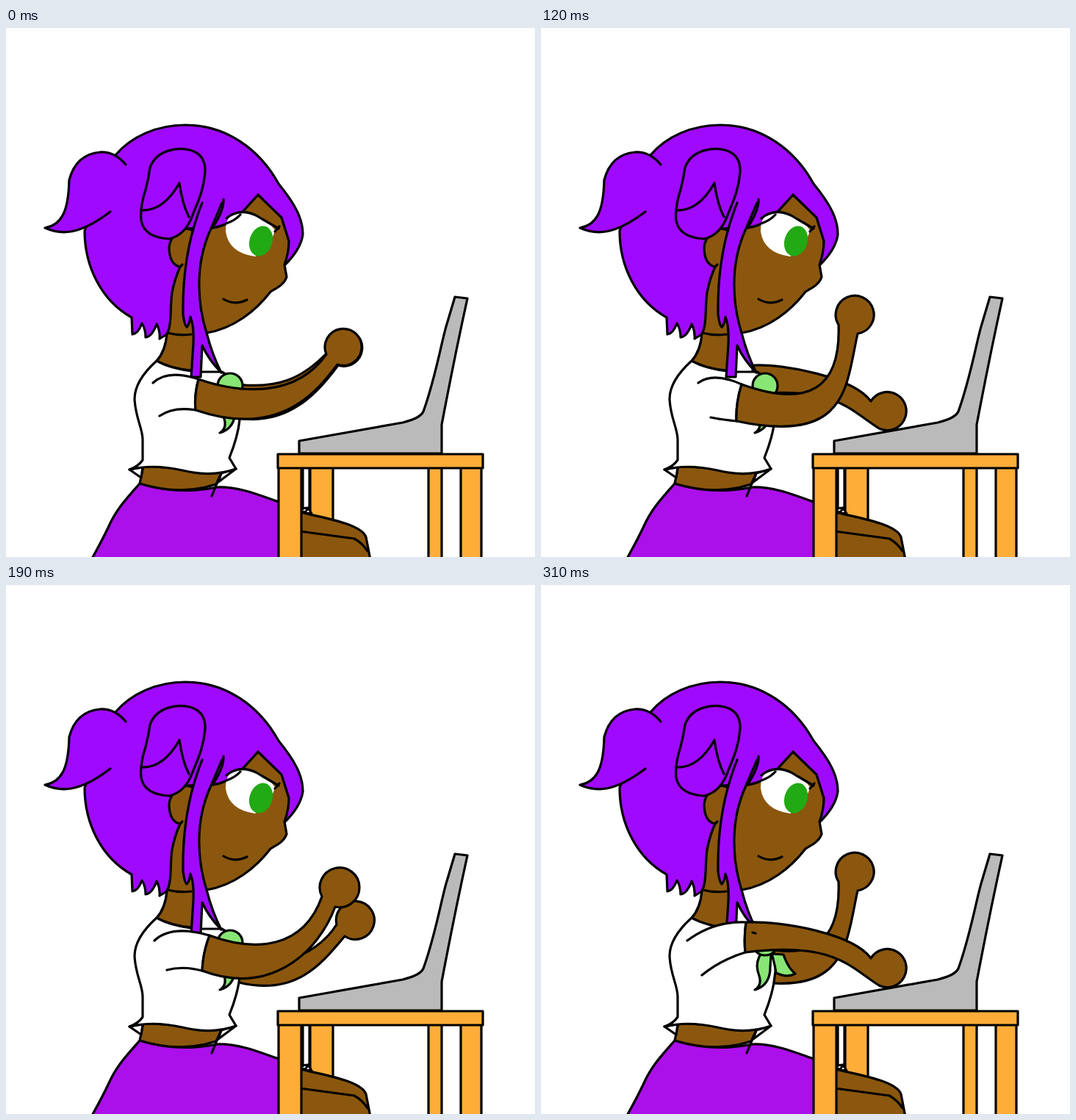
These frames come from a looping animation (720 px wide and 720 px high, 0.35 s). An HTML page:

```html
<!DOCTYPE html>
<html lang="en">
<head>
<meta charset="utf-8">
<title>Typing at the laptop</title>
<style>
  html, body { margin: 0; width: 100%; height: 100%; overflow: hidden; background: #fff; }
  svg { display: block; width: 100vw; height: 100vh; }
  path, rect { stroke: #000; stroke-width: 3.2; stroke-linejoin: round; stroke-linecap: round; fill: none; }
  .skin { fill: #8b570e; }
  .hair { fill: #9f0aff; }
  .skirt { fill: #ab10ea; }
  .white { fill: #fff; }
  .wood { fill: #ffad39; }
  .metal { fill: #bababa; }
  .scarf { fill: #88e674; }
  .bare { stroke: none; }
</style>
</head>
<body>
<svg viewBox="0 0 720 720">
  <!-- legs, skirt and desk -->
  <rect class="wood" x="414" y="596" width="31" height="74"/>
  <path class="skin" d="M400 659C440 668 484 676 490 693L496 724H400Z"/>
  <path d="M400 685L474 695Q485 701 492 712"/>
  <path class="white" d="M401 654L411 653L416 661L402 658M411 653L407 660"/>
  <path class="skirt" d="M116 724C128 702 132 695 139 680C150 655 165 639 182 620Q235 636 288 625C320 624 350 638 374 646V724Z"/>
  <rect class="wood" x="371" y="596" width="31" height="130"/>
  <path d="M404 600V655M413 600V654"/>
  <rect class="wood" x="575" y="596" width="18" height="130"/>
  <rect class="wood" x="619" y="596" width="28" height="130"/>
  <rect class="wood" x="370" y="580" width="279" height="19"/>
  <path class="metal" d="M399 562L540 537Q564 531 568 522C585 475 593 425 600 403L611 366L628 368Q610 450 593 540V579H399Z"/>

  <path class="skin" id="far"/>

  <!-- waist and shirt -->
  <path class="skin" d="M187 596L182 620Q237 637 286 621L294 604Z"/>
  <path class="white" d="M186 598L168 601L184 612ZM293 606L313 600L289 618Z"/>
  <path d="M293 606L280 637"/>
  <path class="white" d="M205 453Q175 480 175 505C176 530 186 545 186 560V588Q180 597 168 601Q200 593 240 602Q280 612 313 600L304 585Q316 555 318 533C322 510 318 482 294 468H265Q235 467 205 453Z"/>

  <!-- head -->
  <path class="hair" d="M149 173C170 148 205 132 244 132C300 132 345 165 371 212C392 238 404 258 404 281Q401 302 379 323L300 350L222 415L209 423Q210 412 205 403Q199 420 190 421Q190 410 185 402Q180 416 172 417L171 394C130 371 107 325 107 276Z"/>
  <path class="hair bare" d="M163 186Q148 168 128 169Q95 172 86 207C85 245 78 268 53 272C75 282 100 282 142 250Z"/>
  <path d="M163 186Q148 168 128 169Q95 172 86 207C85 245 78 268 53 272C75 282 100 282 142 250"/>
  <path class="skin" d="M343 227L375 258L385 290Q385 306 379 322L382 339C378 350 368 354 360 359C340 385 310 409 273 415L252 466Q225 464 205 453Q217 440 219 416C226 405 223 380 226 360Q230 340 237 325Q222 322 222 298Q224 280 246 273L281 272Q306 268 322 250Z"/>
  <path d="M220 415Q235 419 252 417M237 325L240 322"/>
  <path class="hair bare" d="M296 233Q297 248 281 272Q306 268 322 250L343 227L320 200Z"/>
  <path d="M281 272Q306 268 322 250L343 227"/>
  <path class="white bare" d="M299 277Q298 251 322 250Q350 252 366 275Q360 300 339 311Q303 306 299 277Z"/>
  <ellipse cx="347" cy="290" rx="15.5" ry="21" fill="#22aa14" transform="rotate(18 347 290)"/>
  <path d="M300 259Q321 242 347 259L371 273M366 277L372 270" stroke-width="4"/>
  <path d="M300 266Q312 262 319 254" stroke-width="2.5"/>
  <path d="M296 369Q311 378 328 370"/>

  <!-- front strands and near bun -->
  <path class="hair bare" d="M267 238C250 280 240 330 241 390Q243 405 246 407L251 393Q256 405 255 430L252 475H265L267 432Q276 452 293 469Q281 446 273 415C262 380 255 325 279 273L296 233Z"/>
  <path d="M267 238C250 280 240 330 241 390Q243 405 246 407Q250 403 251 393Q256 405 255 430L252 475H265L267 432Q276 452 293 469Q281 446 273 415C262 380 255 325 279 273L294 238"/>
  <path d="M296 233Q297 248 281 272M246 273L253 275"/>
  <path class="hair" d="M196 190C205 165 235 162 250 166Q272 172 271 196C269 220 262 235 255 252Q245 282 222 287Q188 285 184 262Q182 245 190 220Q194 205 196 190Z"/>
  <path d="M184 248Q214 250 236 211Q240 240 249 257"/>

  <!-- scarf -->
  <path class="scarf" d="M300 501Q290 515 297 532Q301 545 291 551Q312 545 312 520L313 503ZM314 502Q318 515 320 528Q335 535 346 529Q336 521 330 503Z"/>
  <path class="scarf" d="M288 487A17 17 0 1 1 322 487A17 17 0 1 1 288 487Z"/>

  <path class="white" id="sleeve"/>
  <path class="skin" id="near"/>
</svg>
<script>
  const LOOP = 350;
  const starts = [0, 40, 80, 120, 150, 190, 230, 270, 310];

  // Drawn poses; gaps are the in-betweens of their neighbours.
  const poses = [];
  poses[0] = {
    near: "M262 478C320 498 395 503 436 444A25 25 0 1 1 451 458C425 492 375 560 258 520Q256 500 262 478Z",
    far: "M300 483C370 495 405 475 436 443A25 25 0 1 1 452 459C428 492 385 545 310 530Z",
    sleeve: "M200 483Q220 464 262 478Q256 500 258 520Q228 515 209 528"
  };
  poses[2] = {
    near: "M272 477C330 500 416 510 419 417A31 31 0 1 1 447 428C424 440 430 560 264 526Q264 500 272 477Z",
    far: "M300 490C350 530 420 512 447 464A31 31 0 1 1 464 481C438 518 392 566 317 542Z",
    sleeve: "M208 482Q230 465 272 477Q264 500 264 526Q242 521 225 524"
  };
  poses[3] = {
    near: "M273 485C365 518 408 490 405 404A26 26 0 1 1 431 416C415 485 420 568 266 535Q265 510 273 485Z",
    far: "M290 459C330 457 425 475 449 508A26 26 0 1 1 460 545C420 520 400 485 278 500Z",
    sleeve: "M214 483Q235 468 273 485Q265 510 266 535Q245 533 231 530"
  };
  poses[5] = {
    near: "M277 477C340 500 405 495 430 424A27 27 0 1 1 448 438C425 500 360 560 267 525Q268 500 277 477Z",
    far: "M300 500C350 530 420 510 450 462A26 26 0 1 1 461 478C430 515 395 560 317 541Z",
    sleeve: "M202 484Q225 462 277 477Q268 500 267 525Q240 518 219 524"
  };
  poses[7] = {
    near: "M278 487C350 512 400 490 445 452A25.5 25.5 0 1 1 458 477C425 500 375 550 274 525Q273 505 278 487Z",
    far: "M300 490C350 508 400 485 445 451A25.5 25.5 0 1 1 459 479C420 503 370 548 317 541Z",
    sleeve: "M206 481Q235 468 278 487Q273 505 274 525Q250 522 226 515"
  };
  poses[8] = {
    near: "M279 459C330 457 425 475 449 508A26 26 0 1 1 460 545C420 520 400 485 278 500Q276 480 279 459ZM288 473L292 474",
    far: poses[3].near,
    sleeve: "M199 484Q235 457 279 459Q276 480 278 500Q245 510 219 531"
  };

  const parts = ["far", "sleeve", "near"];

  function mix(a, b) {
    const ends = b.match(/[\d.]+/g);
    let i = 0;
    return a.replace(/[\d.]+/g, n => (+n + +ends[i++]) / 2);
  }

  for (const i of [1, 4, 6]) {
    poses[i] = {};
    for (const part of parts) poses[i][part] = mix(poses[i - 1][part], poses[i + 1][part]);
  }

  const nodes = parts.map(id => document.getElementById(id));

  function draw(now) {
    const time = now % LOOP;
    const pose = poses[starts.filter(start => start <= time).length - 1];
    nodes.forEach(node => node.setAttribute("d", pose[node.id]));
  }

  function tick() {
    draw(performance.now());
    requestAnimationFrame(tick);
  }

  draw(0);
  requestAnimationFrame(tick);
</script>
</body>
</html>
```
